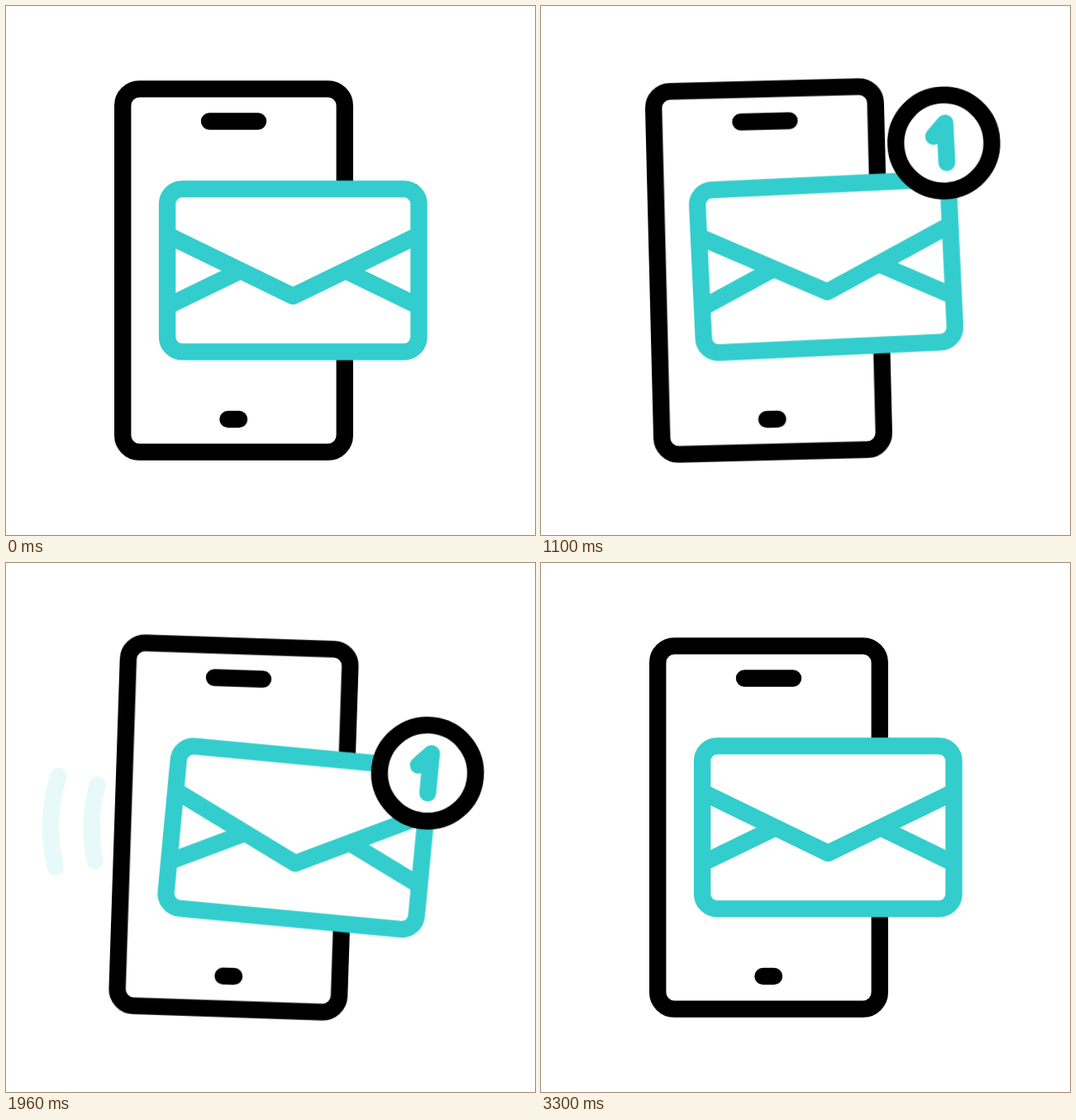
Write an HTML page that moves like this. It is 640 by 640 pixels and loops after 3.6 s.

```html
<!DOCTYPE html>
<html lang="en">
<head>
<meta charset="utf-8">
<title>New message</title>
<style>
  html, body { margin: 0; width: 100%; height: 100%; overflow: hidden; background: #fff; }
  svg { display: block; width: 100%; height: 100%; }

  .line { fill: none; stroke-width: 20.4; stroke-linejoin: round; }
  .solid { fill: #fff; }
  .round { stroke-linecap: round; }
  .ink { stroke: #000; }
  .teal { stroke: #33cdcd; }

  .shake, .swing, .bob, .pop, .near, .far, .fade {
    animation: 3600ms linear infinite;
  }
  .shake { animation-name: shake; animation-timing-function: cubic-bezier(.65, 0, .35, 1); transform-origin: 275.5px 320px; }
  .swing { animation-name: swing; animation-timing-function: ease-in-out; transform-origin: 187px 420px; }
  .bob { animation-name: bob; animation-timing-function: ease-in-out; }
  .pop { animation-name: pop; }
  .near, .far { animation-timing-function: cubic-bezier(.5, 0, .2, 1); }
  .near { animation-name: near; }
  .far { animation-name: far; }
  .fade { animation-name: fade; }

  /* nine 240 ms swings */
  @keyframes shake {
    0%, 60%, 100% { transform: rotate(0deg); }
    1.667%, 8.333%, 15%, 21.667%, 28.333%, 35%, 41.667%, 48.333%, 55% { transform: rotate(2deg); }
    5%, 11.667%, 18.333%, 25%, 31.667%, 38.333%, 45%, 51.667%, 58.333% { transform: rotate(-2deg); }
  }
  @keyframes swing {
    0%, 2.222% { transform: rotate(0deg); }
    16.667% { transform: rotate(13.8deg); }
    31.667% { transform: rotate(-1.4deg); }
    45.556% { transform: rotate(13.7deg); }
    60.833% { transform: rotate(-2.2deg); }
    66.389% { transform: rotate(5deg); }
    73.333% { transform: rotate(-1deg); }
    77.778% { transform: rotate(.5deg); }
    80.556%, 100% { transform: rotate(0deg); }
  }
  @keyframes bob {
    0%, 25.4% { transform: translateY(0); }
    34.444% { transform: translateY(-62px); }
    44.722% { transform: translateY(35px); }
    60.556% { transform: translateY(0); }
    65.833% { transform: translateY(25px); }
    73.333%, 100% { transform: translateY(0); }
  }
  @keyframes pop {
    0% { transform: scale(0); animation-timing-function: cubic-bezier(.333, 1.75, .667, 1); }
    9.444% { transform: scale(1); }
    80.556% { transform: scale(1); animation-timing-function: cubic-bezier(.333, 0, .667, -.75); }
    91.667%, 100% { transform: scale(0); }
  }
  @keyframes far {
    0%, 35% { transform: translateX(141px); }
    23.889%, 34.999%, 58.889%, 100% { transform: translateX(52px); }
  }
  @keyframes near {
    0%, 35% { transform: translateX(178px); }
    23.889%, 34.999%, 58.889%, 100% { transform: translateX(102px); }
  }
  @keyframes fade {
    0%, 35% { opacity: 1; }
    8.6%, 43.6% { opacity: 1; animation-timing-function: cubic-bezier(.1, .4, .4, .8); }
    23.889%, 34.999%, 58.889%, 100% { opacity: 0; }
  }
</style>
</head>
<body>
<svg viewBox="0 0 640 640">
  <g class="shake">
    <g class="fade line teal round" transform="translate(0 320)">
      <path class="far" d="M7.5-55Q-7.5 0 7.5 55"/>
      <path class="near" d="M5.5-46Q-5.5 0 5.5 46"/>
    </g>

    <g class="line ink round">
      <rect class="solid" x="141.2" y="100.4" width="268.6" height="439.2" rx="20"/>
      <path d="M246 139.5h59M268.5 500h13.5"/>
    </g>

    <g class="swing">
      <g class="line teal">
        <rect class="solid" x="195.1" y="221.4" width="304.4" height="197" rx="18"/>
        <path d="M195 277L347.3 351 499.6 277M195 363.4L283.5 320.4M499.6 363.4L411.1 320.4"/>
      </g>
      <g transform="translate(496.5 216.5)">
        <g class="bob">
          <g class="pop line">
            <circle class="solid ink" r="58.1"/>
            <path class="teal round" d="M-12-8.5L2.5-24V24"/>
          </g>
        </g>
      </g>
    </g>
  </g>
</svg>
</body>
</html>
```
